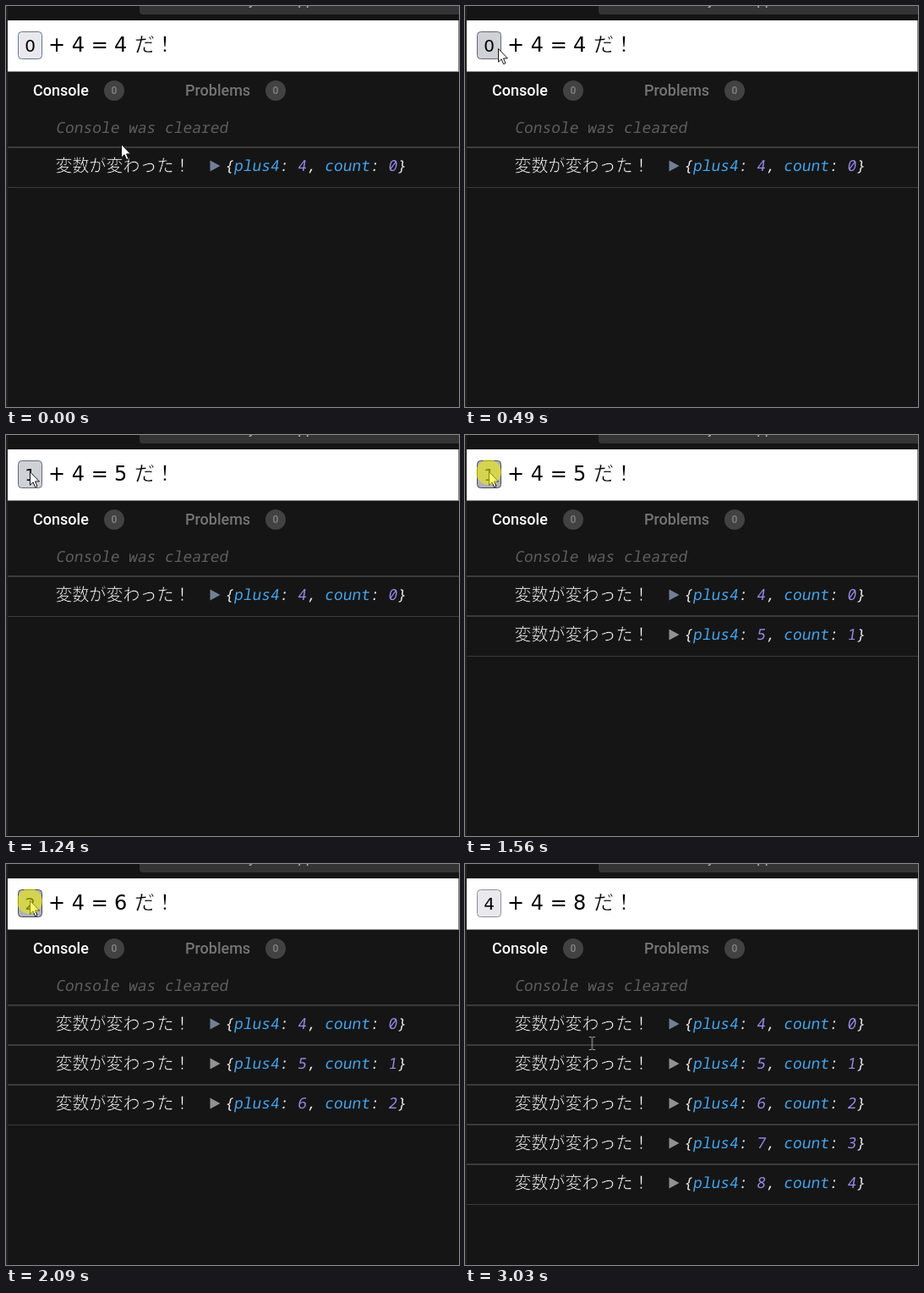
Write an HTML page that moves like this. It is 536 by 474 pixels and loops after 3.1 s.

```html
<!DOCTYPE html>
<html lang="ja">
<head>
<meta charset="utf-8">
<title>Counter console</title>
<style>
html, body { margin: 0; width: 100%; height: 100%; overflow: hidden; background: #151515; }
svg { overflow: hidden; }
#stage { display: block; width: 536px; height: 474px; }
text { white-space: pre; }

.ui { font: 500 18px Roboto, sans-serif; }
.badge { font: 500 12px Roboto, sans-serif; fill: #858585; text-anchor: middle; }
.mono { font: 500 17.9px "Noto Sans Mono", monospace; fill: #e6e6e6; }
.math { font: 24px "DejaVu Sans", sans-serif; }
.label { font: 20px "DejaVu Sans", sans-serif; text-anchor: middle; }
.jp { font-family: "Noto Sans CJK JP", "Noto Sans CJK", sans-serif; }
/* a stroke in the background colour thins the glyphs */
.thin { stroke: #fff; stroke-width: .4px; }
.log { font-size: 20px; font-weight: 300; fill: #fff; stroke: #151515; stroke-width: .6px; }
.key { fill: #45a4ec; }
.num { fill: #978ae4; }

.button, .press, .strip, .pointer, .arrow, .beam, .row { animation: 3100ms step-end infinite; }
.button { animation-name: button; }
.press { animation-name: press; }
.strip { animation-name: count; }
.pointer { animation-name: move; }
.arrow { animation-name: arrow; }
.beam { animation-name: beam; }
.row1 { animation-name: row1; }
.row2 { animation-name: row2; }
.row3 { animation-name: row3; }
.row4 { animation-name: row4; }

@keyframes button {
  0% { fill: #e9e9ed; stroke: #68769a; }
  15.806%, 37.741%, 54.516%, 73.87%, 90.967% { fill: #d0d0d7; stroke: #676774; }
  35.161%, 50.322%, 67.419%, 86.774% { fill: #b1b1b9; stroke: #484851; }
  93.225%, 100% { fill: #e9e9ed; stroke: #8f8f9d; }
}
@keyframes press {
  0%, 37.741%, 54.516%, 73.87%, 90.967%, 100% { opacity: 0; }
  35.161%, 50.322%, 67.419%, 86.774% { opacity: 1; }
}
@keyframes count {
  0% { transform: translateY(0); }
  40% { transform: translateY(-40px); }
  56.774% { transform: translateY(-80px); }
  73.87% { transform: translateY(-120px); }
  90.967%, 100% { transform: translateY(-160px); }
}
@keyframes move {
  0% { transform: translate(136px, 163px); }
  2.58% { transform: translate(134px, 160px); }
  4.838% { transform: translate(126px, 149px); }
  7.096% { transform: translate(110px, 129px); }
  9.354% { transform: translate(89px, 104px); }
  11.612% { transform: translate(67px, 80px); }
  13.548% { transform: translate(49px, 61px); }
  15.806% { transform: translate(39px, 50px); }
  18.064% { transform: translate(38.5px, 50px); }
  20.322% { transform: translate(34px, 46px); }
  23.548% { transform: translate(30px, 44px); }
  26.774% { transform: translate(28px, 43px); }
  93.225% { transform: translate(48px, 73px); }
  95.483% { transform: translate(105.5px, 150px); }
  97.741%, 100% { transform: translate(150.5px, 212px); }
}
@keyframes arrow { 0% { opacity: 1; } 95.483%, 100% { opacity: 0; } }
@keyframes beam { 0% { opacity: 0; } 95.483%, 100% { opacity: 1; } }
@keyframes row1 { 0% { opacity: 0; } 42.258%, 100% { opacity: 1; } }
@keyframes row2 { 0% { opacity: 0; } 59.032%, 100% { opacity: 1; } }
@keyframes row3 { 0% { opacity: 0; } 73.87%, 100% { opacity: 1; } }
@keyframes row4 { 0% { opacity: 0; } 90.967%, 100% { opacity: 1; } }
</style>
</head>
<body>
<svg id="stage" viewBox="0 0 536 474">
  <rect width="536" height="474" fill="#151515"/>

  <!-- top bar -->
  <path d="M158 0H536V10H162Q158 10 158 6Z" fill="#343434"/>
  <text x="188" y="-1" font-size="17" font-family="Roboto, sans-serif" fill="#b4b4b4">count state by mini app</text>

  <!-- page preview -->
  <rect x="2" y="17" width="534" height="61" fill="#888"/>
  <rect x="2" y="17" width="533" height="60" fill="#fff"/>
  <rect class="button" x="14.5" y="30.5" width="28" height="32" rx="4"/>
  <svg x="15" y="31" width="27" height="31"><g class="strip label" id="clicks"></g></svg>
  <text class="math" x="50" y="54">+ 4 =</text>
  <svg x="128" y="30" width="18" height="30"><g class="strip math" id="sum"></g></svg>
  <text class="jp thin" x="152" y="54" font-size="24">だ&#xFF01;</text>

  <!-- console -->
  <text class="ui" x="32" y="106" fill="#fff">Console</text>
  <text class="ui" x="212" y="106" fill="#757575">Problems</text>
  <g fill="#424242"><circle cx="128" cy="100" r="12"/><circle cx="319" cy="100" r="12"/></g>
  <text class="badge" x="128" y="104.3">0</text>
  <text class="badge" x="319" y="104.3">0</text>
  <text class="mono" transform="translate(58.5 150) skewX(-9)" style="fill:#5e5e5e">Console was cleared</text>
  <g id="rows"></g>
  <rect width="2" height="474" fill="#222"/>

  <!-- pointer -->
  <g class="pointer">
    <path class="arrow" d="M.5 .5V16.2L4.1 12.8L6.6 18.6L9 17.6L6.5 11.9H11.4Z" fill="#fff" stroke="#111" stroke-width="1"/>
    <path class="beam" d="M-3.5 -7.5H-1L0 -6.5L1 -7.5H3.5M0 -6.5V6.5M-3.5 7.5H-1L0 6.5L1 7.5H3.5" fill="none" stroke="#b8b8b8"/>
  </g>
  <circle class="press" cx="28" cy="44" r="15" fill="#f0f000" fill-opacity=".55"/>
</svg>
<script>
const fill = (id, draw) => {
  document.getElementById(id).innerHTML = [0, 1, 2, 3, 4].map(draw).join("");
};

fill("clicks", n => `<text x="13.5" y="${23 + 40 * n}">${n}</text>`);
fill("sum", n => `<text y="${24 + 40 * n}">${n + 4}</text>`);

const pair = (key, num) => `<tspan class="key">${key}</tspan>: <tspan class="num">${num}</tspan>`;

fill("rows", n => `<g transform="translate(0 ${47 * n})"><g class="row row${n}">
  <path d="M2 166H536V168H2ZM2 214H536V215H2Z" fill="#3b3b3b"/>
  <text class="jp log" x="58.5" y="196">変数が変わった&#xFF01;</text>
  <path d="M241.5 182.5L253.5 189L241.5 195.5Z" fill="${n ? "#929292" : "#718096"}"/>
  <text class="mono" transform="translate(258.5 195) skewX(-9)">{${pair("plus4", n + 4)}, ${pair("count", n)}}</text>
</g></g>`);
</script>
</body>
</html>
```
